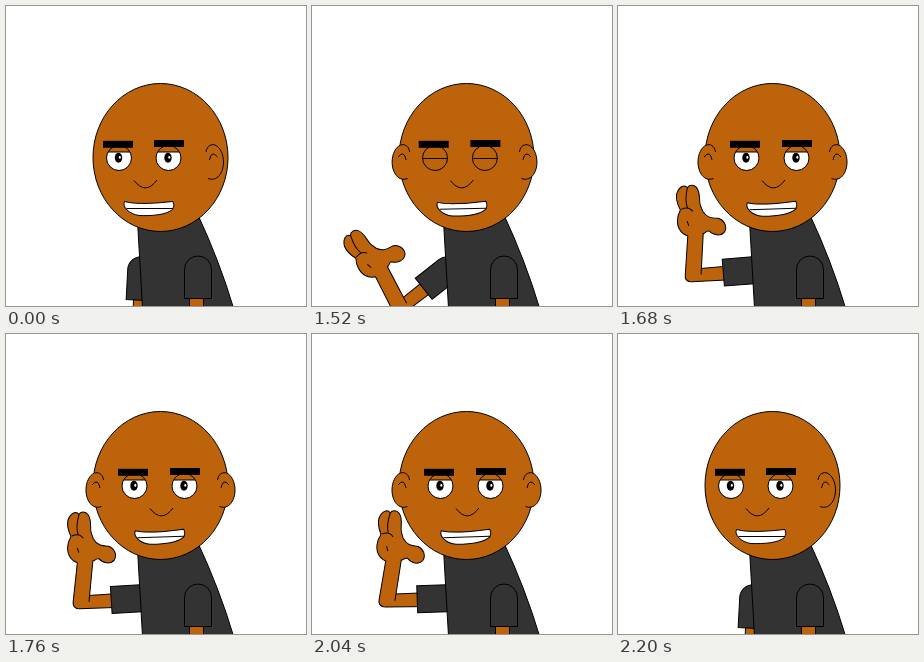
An HTML page with a canvas that plays this animation: 300x300 px, repeating every 2240 ms.

```html
<!DOCTYPE html>
<html lang="en">
<head>
<meta charset="utf-8">
<title>Waving man</title>
<style>
html, body { margin: 0; width: 100%; height: 100%; overflow: hidden; background: #fff; }
canvas { display: block; }
</style>
</head>
<body>
<canvas id="stage" width="300" height="300"></canvas>
<script>
const c = document.getElementById('stage').getContext('2d');
const SKIN = '#bd630c', SHIRT = '#333', LOOP = 2240, STEP = 40;

const ease = (t, from, to) => {
  const x = Math.min(1, Math.max(0, (t - from) / (to - from)));
  return x * x * (3 - 2 * x);
};

function shape(d, fill) {
  const path = new Path2D(d);
  if (fill) { c.fillStyle = fill; c.fill(path); }
  c.stroke(path);
}

function oval(x, y, rx, ry, fill) {
  c.beginPath();
  c.ellipse(x, y, rx, ry, 0, 0, 7);
  c.fillStyle = fill;
  c.fill();
}

function group(draw) {
  c.save();
  draw();
  c.restore();
}

function rotate(deg, x, y) {
  c.translate(x, y);
  c.rotate(deg * Math.PI / 180);
  c.translate(-x, -y);
}

// Arm drawn in its raised pose, hinged at shoulder and elbow
function wavingArm(turn, bend) {
  group(() => {
    c.translate(-.3, .7);
    rotate(turn, 135.5, 263.5);
    shape('M120 260.5L83 268.5L72 270L69 277Q70 284 76 283L124 274', SKIN);
    group(() => {
      rotate(bend, 75, 276);
      shape('M84 273L74 233C76 233 75 230 79 229C84 232 92 231 94 225C95 219 90 214 84 214' +
        'C77 216 73 217 67 212L63 207C60 203 60 195 54 191C51 189 46 190 45.5 194C41 191 37 196 37 203' +
        'C38 210 42 214 45 217C46 220 44 221 45 225C46 234 52 240 60 240L69 278Q70 284 76 283', SKIN);
      shape('M45.5 194C46 201 47 208 51.5 213M46 216.5Q52 211 57.5 215M55 226L58 230');
    });
    group(() => {
      rotate(78, 135.5, 263.5);
      shape('M122 293.5V263.5A13.5 13.5 0 0 1 149 263.5V293.5Z', SHIRT);
    });
  });
}

function body() {
  shape('M131.5 215L136.5 302H227.5Q213.5 255 191.5 208Z', SHIRT);
  shape('M183.5 290V302H197.5V290', SKIN);
  shape('M178.5 292.5V263.5A13.5 13.5 0 0 1 205.5 263.5V292.5Z', SHIRT);
}

function ear(shift, mirrored) {
  group(() => {
    if (mirrored) { c.translate(309, 0); c.scale(-1, 1); }
    c.translate(shift, 0);
    shape('M200 146C201 139 206 138 209 139C214 141 217.5 148 217.5 156C217.5 167 211 176 202 172.5', SKIN);
    shape('M203.5 154Q205.5 143.5 211.5 151');
  });
}

function eye(x, blink) {
  const y = 152, r = 12.5, top = 146 + 6.5 * blink, bottom = Math.max(top, 165 - 18 * blink);
  oval(x, y, r, r, SKIN);
  group(() => {
    c.clip();
    group(() => {
      c.beginPath();
      c.rect(x - 13, top, 26, bottom - top);
      c.clip();
      oval(x, y, r, r, '#fff');
      oval(x - .5, y - .3, 3.7, 5, '#000');
      oval(x + .8, y - .8, 1, 1.5, '#fff');
    });
    shape(`M${x - 13} ${top}h26M${x - 13} ${bottom}h26`);
  });
  c.beginPath();
  c.arc(x, y, r, 0, 7);
  c.stroke();
}

function face(k, blink) {
  eye(113 + 15.5 * k, blink);
  eye(162.5 + 16 * k, blink);
  c.fillStyle = '#000';
  c.fillRect(97 + 15 * k, 134.8, 30, 7);
  c.fillRect(148 + 16 * k, 134, 30, 7);
  group(() => {
    c.translate(16 * k, 0);
    shape('M128 174.5Q139.5 189.5 151 174');
  });
  group(() => {
    c.translate(11 * k, .5 * k);
    rotate(-2 * k, 143, 203);
    shape('M118.5 195.5C131 199 152 197 167 195.5Q169 200 166.5 203.5C160 209 146 210 133 209.5C123 208 116 201 118.5 195.5Z', '#fff');
    shape('M120.5 202.5H167');
  });
}

function draw(t) {
  const k = ease(t, 1400, 1600) - ease(t, 2040, 2200);
  const wave = ease(t, 1600, 1720) - ease(t, 1720, 1880) + ease(t, 1880, 2040);
  const blink = ease(t, 1440, 1520) - ease(t, 1520, 1680);
  const bend = k ? 13 * wave * k + 16 * Math.sin(Math.PI * k) ** 2 : -88;
  const leftEar = () => ear(11.5 - 8 * (1 - k) ** 4, true);

  c.fillStyle = '#fff';
  c.fillRect(0, 0, 300, 300);
  c.strokeStyle = '#000';
  c.lineWidth = 1;
  wavingArm(-75 + (75 + 10 * wave) * k, bend);
  body();
  if (k > 0 && k < .5) leftEar();
  oval(154.5, 151.5, 67.5, 74, SKIN);
  c.stroke();
  if (k >= .5) leftEar();
  ear(11.5 * k);
  face(k, blink);
}

const start = performance.now();
function tick() {
  const t = (performance.now() - start) % LOOP;
  draw(Math.floor(t / STEP) * STEP);
  requestAnimationFrame(tick);
}
tick();
</script>
</body>
</html>
```
